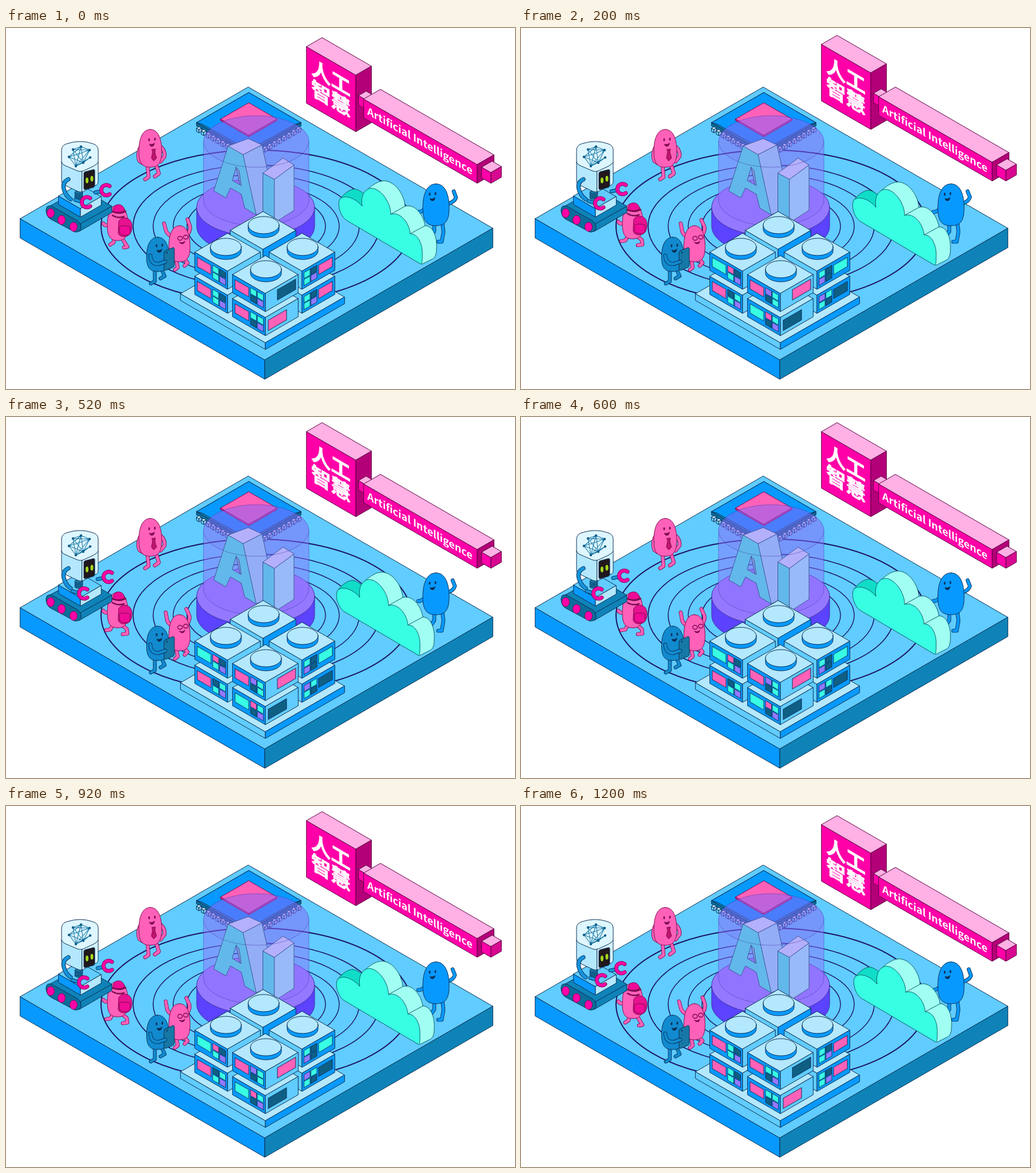
An HTML page that plays this animation: 889x630 px, repeating every 1.4 s.

```html
<!DOCTYPE html>
<html lang="zh-Hant">
<head>
<meta charset="utf-8">
<title>人工智慧</title>
<style>
html, body { margin: 0; width: 100%; height: 100%; overflow: hidden; background: #fff; }
svg { display: block; width: 889px; height: 630px; }
.move, .a, .b { animation: 1.4s step-end infinite; }
.a { animation-name: rest; }
.b { animation-name: active; }
.sign { animation-name: bob; }
.cloud { animation-name: drift; }
.clawL { animation-name: clawL; }
.clawR { animation-name: clawR; }
.hop { animation-name: hop; }
@keyframes rest { 0%, 85.7143% { opacity: 1 } 14.2857% { opacity: 0 } 100% { opacity: 1 } }
@keyframes active { 0%, 85.7143% { opacity: 0 } 14.2857% { opacity: 1 } 100% { opacity: 0 } }
@keyframes bob {
  0%, 85.7143%, 100% { transform: translate(0, 0) }
  14.2857%, 71.4286% { transform: translate(0, -4px) }
  28.5714% { transform: translate(0, -7px) }
}
@keyframes drift {
  0%, 85.7143%, 100% { transform: translate(0, 0) }
  14.2857%, 42.8571%, 71.4286% { transform: translate(-2px, 2px) }
  28.5714%, 57.1429% { transform: translate(-4px, 4px) }
}
@keyframes clawL {
  0%, 85.7143%, 100% { transform: translate(0, 0) }
  14.2857%, 71.4286% { transform: translate(-3px, 2px) }
  28.5714%, 57.1429% { transform: translate(-5px, 4px) }
  42.8571% { transform: translate(-6px, 4px) }
}
@keyframes clawR {
  0%, 85.7143%, 100% { transform: translate(0, 0) }
  14.2857%, 71.4286% { transform: translate(2px, -2px) }
  28.5714%, 57.1429% { transform: translate(4px, -4px) }
  42.8571% { transform: translate(5px, -6px) }
}
@keyframes hop {
  0%, 85.7143%, 100% { transform: translate(0, 0) }
  14.2857% { transform: translate(0, -3px) }
}
</style>
</head>
<body>
<svg id="stage" viewBox="0 0 889 630" stroke-linejoin="round" stroke-linecap="round" fill-rule="evenodd"></svg>
<script>
const K = 0.577;
const INK = '#0a2f55', WINE = '#7d0a50';
const SKY = '#61ccff', BLUE = '#0899ff', DEEP = '#0f83b8', PALE = '#b3e8ff';
const PINK = '#ff61b8', HOT = '#ff00a8', ROSE = '#ffb0e4', PLUM = '#b30078';
const LED = { p: PINK, t: '#38ffe4', d: '#0f5f85', v: '#9478ff' };

const path = (d, fill, stroke = INK, w = 1) =>
  `<path d="${d}" fill="${fill}" stroke="${stroke}" stroke-width="${w}"/>`;
const line = (d, stroke = INK, w = 1) => path(d, 'none', stroke, w);
const poly = (pts, fill, stroke) => path(`M${pts}Z`, fill, stroke);
const oval = (x, y, rx, ry, fill, stroke = INK, w = 1) =>
  `<ellipse cx="${x}" cy="${y}" rx="${rx}" ry="${ry}" fill="${fill}" stroke="${stroke}" stroke-width="${w}"/>`;
const group = (cls, ...parts) => `<g class="${cls}">${parts.join('')}</g>`;
const limb = (d, color, w = 4.8, ink = INK) => line(d, ink, w + 1.8) + line(d, color, w);
const times = (n, f) => Array.from({ length: n }, (_, i) => f(i)).join('');

// Isometric block: (x, y) is the near top corner, a and b its reach to the left and right.
function block(x, y, a, b, h, top, left, right, ink = INK) {
  const l = [x - a, y - a * K], r = [x + b, y - b * K], back = [x - a + b, y - (a + b) * K];
  return poly([l, [x, y], [x, y + h], [l[0], l[1] + h]].join('L'), left, ink) +
    poly([r, [x, y], [x, y + h], [r[0], r[1] + h]].join('L'), right, ink) +
    poly([l, back, r, [x, y]].join('L'), top, ink);
}

function rings() {
  return [[271, 133, 2], [215, 107, 1.6], [180, 90, 1.5], [145, 73, 1.4], [121, 61, 1.4]]
    .map(([rx, ry, w]) => oval(437, 346, rx, ry, 'none', '#1b1464', w)).join('');
}

function chip() {
  const pin = (x, y) => block(x, y, 4, 4, 6, '#d4f1ff', '#61ccff', '#8fc8f5');
  return block(424, 217.5, 91, 91, 6, DEEP, '#0b6d9c', '#0b6d9c') +
    poly('333 165L424 112.5L515 165L505 168L424 213L343 168', BLUE) +
    block(424, 187, 49, 49, 3, PINK, '#d6248f', '#d6248f', WINE) +
    times(10, i => pin(337 + 8.4 * i, 177 + 4.85 * i) + pin(511 - 8.4 * i, 177 + 4.85 * i));
}

function column() {
  const edge = '#3c2fa0', ink = '#41589c';
  return path('M333 313V346A103 50 0 0 0 539 346V313Z', '#5b43ff', edge) +
    oval(436, 313, 103, 50, '#9478ff', edge) +
    `<g opacity=".47">${path('M345 198A92 45 0 0 1 529 198V300A92 45 0 0 1 345 300Z', '#8c70ff', 'none')}</g>` +
    `<g opacity=".1">${oval(437, 198, 92, 45, '#7040d8', 'none')}</g>` +
    poly('414 221L447 204L457 250L449 254V321L437 326', '#94adf7', ink) +
    poly('388 206L423 193L447 204L414 221', '#b4b0fc', ink) +
    path('M363 284L388 206L414 221L437 326L417 314L411 290L392 279L384 296ZM402 243L395 266L409 274Z', '#62b8ea', ink) +
    poly('402 243L407 249L411 275L409 274', '#8599e6', ink) +
    poly('449 253L469 264V340L449 328', '#62b8ea', ink) +
    poly('469 264L503 239V318L469 340', '#98baf9', ink) +
    poly('449 253L484 227L503 239L469 264', '#b4b0fc', ink) +
    `<g opacity=".45">${oval(437, 198, 92, 45, 'none', edge)}
      ${line('M345 198V300A92 45 0 0 0 529 300V198', edge)}</g>`;
}

// Lights on one server face; the first letter is the wide screen, then four cells.
function lights(code, x, y, flip) {
  const cell = (u, v, w, h, c) =>
    `<rect x="${u}" y="${v}" width="${w}" height="${h}" fill="${LED[c]}" stroke="${INK}" stroke-width=".9"/>`;
  return `<g transform="matrix(${flip ? -1 : 1} ${K} 0 1 ${x} ${y})">` + cell(4, 7, 24, 16, code[0]) +
    times(4, i => cell(31 + 12 * (i % 2), i < 2 ? 5 : 17, 10.5, 10.5, code[i + 1])) + '</g>';
}

function screen(c, u, v, y) {
  return `<g transform="matrix(-1 ${K} 0 1 510 ${y})"><rect x="${u}" y="${v}" width="32" height="18"
    fill="${LED[c]}" stroke="${INK}"/></g>`;
}

function tower(x, y, left, right) {
  const cap = y - 42, cx = x < 400 ? x - 3 : x + 1;
  return block(x, y + 42, 57, 57, 32, PALE, left, right) +
    block(x, y, 57, 57, 32, PALE, left, right) +
    path(`M${cx - 27} ${cap}v7a27 15 0 0 0 54 0v-7Z`, BLUE) + oval(cx, cap, 27, 15, PALE);
}

function servers() {
  const state = (cls, l1, l2, r1, r2) =>
    group(cls, lights(l1, 330, 391), lights(l2, 330, 433), lights(r1, 574, 391, 1), lights(r2, 574, 433, 1));
  const front = (cls, f1, f2, s1, s2) =>
    group(cls, lights(f1, 396, 430), lights(f2, 396, 472), screen(s1, 4, 6, 430), screen(s2, 20, 8, 472));
  return block(453, 549, 148, 138, 12, PALE, SKY, BLUE) +
    tower(449, 386, SKY, BLUE) + tower(387, 424, BLUE, SKY) + tower(517, 424, SKY, BLUE) +
    state('a', 'ptdtv', 'ptdtv', 'pdtvt', 'pdtvt') + state('b', 'tpdtv', 'pdttv', 'tdtdv', 'dtvdt') +
    tower(453, 463, BLUE, SKY) +
    front('a', 'pttdv', 'pttdv', 'd', 'p') + front('b', 'pvtdt', 'tptdv', 'p', 'd');
}

function sign() {
  const pink = [ROSE, HOT, PLUM, '#5c0040'];
  const font = `fill="#fff" font-family="'Noto Sans CJK TC','Noto Sans CJK',sans-serif"`;
  return group('move sign',
    block(611, 82, 86, 27, 99, ...pink),
    `<g transform="matrix(1 .58 0 1 525 32)" ${font} stroke="#fff" stroke-width=".9"
      font-weight="900" font-size="34.5" text-anchor="middle"><text x="42.5" y="43">人工</text><text x="42.5" y="79">智慧</text></g>`,
    block(632, 127, 16, 13, 17, ...pink),
    block(823, 238, 198, 29, 33, ...pink),
    `<text transform="matrix(1 ${K} 0 1 625 124)" x="6" y="23" ${font}
      font-weight="700" font-size="18">Artificial Intelligence</text>`,
    block(847, 252, 16, 18, 19, ROSE, HOT, '#d6088f', '#5c0040'));
}

function cloud() {
  const ink = '#0b5f66';
  return group('move cloud',
    path('M583 299C592 287 602 281 610 281C618 283 624 288 628 292L622 311Z', '#10dcc8', ink),
    path('M630 283C645 269 655 266 664 267C684 271 696 295 697 311C713 306 729 325 732 345C746 345 753 365 752 384C752 398 748 402 743 404L727 412Z', '#a0fff2', ink),
    path('M597 337C584 331 578 308 583 299C590 290 610 296 622 311C618 290 630 275 645 281C660 287 672 308 672 325C687 320 704 338 706 359C720 359 728 378 727 396C727 404 727 411 725 412Z', '#38ffe4', ink),
    line('M672 325L697 311M706 359L732 345', ink));
}

const egg = (x, top, bottom, r, fill, ink) => {
  const m = top + (bottom - top) * .58, s = (bottom - top) * .33;
  return path(`M${x} ${top}C${x + r * .7} ${top} ${x + r} ${m - s} ${x + r} ${m}C${x + r} ${m + s} ${x + r * .65} ${bottom} ${x} ${bottom}C${x - r * .65} ${bottom} ${x - r} ${m + s} ${x - r} ${m}C${x - r} ${m - s} ${x - r * .7} ${top} ${x} ${top}Z`, fill, ink);
};
const face = (x, y, ink) => oval(x - 5, y, 1.5, 2.8, ink, 'none') + oval(x + 5, y - 1, 1.5, 2.8, ink, 'none') +
  path(`M${x - 5} ${y + 7}q6 2 10 -2q-1 7 -5 7q-4 0 -5 -5Z`, ink, 'none');

function waver() {
  const l = d => limb(d, BLUE);
  return l('M732 315Q725 322 720 321') +
    l('M748 338L748 355L743 362') + l('M762 338L764 356L761 373L755 373') +
    group('a', l('M771 307Q783 304 786 296L782 285')) + group('b', l('M771 306Q782 303 784 295L780 285')) +
    egg(751, 272, 345, 23, BLUE) + face(745, 290, INK);
}

function clerk() {
  const l = d => limb(d, PINK, 4.8, WINE);
  return l('M236 206Q228 220 233 232L239 236') + l('M270 207Q278 214 277 224L270 233') +
    l('M247 238L249 260L243 264') + l('M262 238L267 254L260 259') +
    egg(252, 177, 243, 20, PINK, WINE) + face(255, 195, WINE) +
    poly('255 212L261 211L260 217L263 227L258 232L254 227L256 217', '#c0146e', WINE);
}

function hiker() {
  const l = d => limb(d, PINK, 4.8, WINE);
  return group('a', l('M189 362L188 374L182 378'), l('M201 364L207 374L212 382L206 383')) +
    group('b', l('M188 361L182 371L175 372'), l('M201 362L211 370L212 378L204 379')) +
    group('move hop',
      l('M182 341Q174 348 170 341'),
      egg(195, 309, 371, 18, PINK, WINE),
      line('M186 327Q196 333 206 329', WINE, 2.5),
      path('M187 320Q187 308 197 308Q206 309 207 319Q198 324 187 320Z', '#f00b96', WINE),
      path('M185 320Q196 326 209 320', 'none', WINE, 2.5),
      path('M197 337Q202 329 212 332Q221 336 220 349Q219 362 209 364Q198 365 196 358Z', '#e6128f', WINE),
      path('M198 347Q207 343 217 347L216 360Q207 364 199 359Z', '#f00b96', WINE));
}

function cheerer() {
  const l = d => limb(d, PINK, 4.8, WINE);
  return group('a', l('M288 363Q280 358 279 352L276 341'), l('M317 361Q323 352 321 345L317 334')) +
    group('b', l('M288 363Q281 358 281 352L279 341'), l('M317 361Q322 352 320 346L315 335')) +
    l('M297 403L300 418L295 422') + l('M311 402L317 410L312 415') +
    egg(303, 345, 408, 18.5, PINK, WINE) +
    oval(304, 367, 4, 3.5, 'none', WINE, 1.4) + oval(314, 365, 4, 3.5, 'none', WINE, 1.4) +
    path('M302 373q7 3 11 -2q-1 6 -5 6q-4 0 -6 -4Z', WINE, 'none');
}

function reader() {
  const skin = '#118acf', l = d => limb(d, skin);
  return l('M260 421L260 442L253 446') + l('M271 419L277 433L270 437') +
    egg(265, 365, 425, 19.5, skin) + face(268, 380, INK) +
    path('M278 389L292 383Q294 383 294 386V414Q294 417 291 418L279 423Q276 423 276 420V392Q276 390 278 389Z', '#1678a6') +
    oval(281, 392, 1.2, 1.5, INK, 'none') +
    l('M252 397Q253 412 266 412L278 408');
}

function robot() {
  const nodes = [[110, 225], [117, 212], [131, 207], [146, 213], [147, 226], [135, 235], [122, 241]];
  const claw = (x, y) => limb(`M${x + 6} ${y - 7}A9 9 0 1 0 ${x + 6} ${y + 7}`, HOT, 5, WINE);
  const wheel = (x, y) => oval(x, y, 6.5, 8, HOT, WINE);
  const web = nodes.map((p, i) => nodes.slice(i + 1).filter((_, j) => (i + j) % 3)
    .map(q => `M${p}L${q}`).join('')).join('');
  return poly('78 310L132 280L185 311L131 342', DEEP) +
    poly('131 341L185 311V322L128 355', DEEP) +
    path('M70 318Q70 308 80 311L124 336Q132 341 131 350Q128 357 120 356L77 333Q70 328 70 318Z', '#0b6d9c') +
    wheel(78, 323) + wheel(97, 335) + wheel(118, 347) +
    block(130, 315, 38, 36, 15, SKY, BLUE, PALE) +
    times(4, i => oval(127, 296 - 3 * i, 7, 3, '#1678a6')) +
    path('M97 234V267Q97 272 102 274L123 284Q128 287 133 286V250Z', PALE) +
    path('M133 250L161 234V268Q161 273 156 275L137 284Q135 286 133 286Z', '#d2f2ff') +
    path('M97 234V213Q97 205 106 202Q130 194 152 202Q161 205 161 213V234Q159 238 153 241L138 248Q131 252 124 249L103 240Q98 238 97 234Z', '#def6ff') +
    line(web, '#1678a6', 1.1) + nodes.map(([x, y]) => oval(x, y, 2.2, 2.2, '#125e88', 'none')).join('') +
    path('M138 251L153 247Q155 247 155 249V275L153 278L138 282Q136 282 136 280V253Z', '#20181c') +
    oval(141.5, 266, 2.5, 5, '#a4d81c', 'none') + oval(150, 263, 2.5, 5, '#a4d81c', 'none') +
    limb('M109 264Q98 269 101 281Q104 293 113 299', '#1593dc', 5.5) +
    group('move clawL', limb('M121 300L132 303', '#1593dc'), claw(141, 304)) +
    group('move clawR', limb('M156 287L166 285', '#1593dc'), claw(175, 283));
}

document.getElementById('stage').innerHTML = [
  block(452, 579, 427, 398, 34, SKY, BLUE, DEEP),
  rings(), chip(), column(), sign(), waver(), cloud(), clerk(),
  hiker(), robot(), cheerer(), reader(), servers()
].join('');
</script>
</body>
</html>
```
